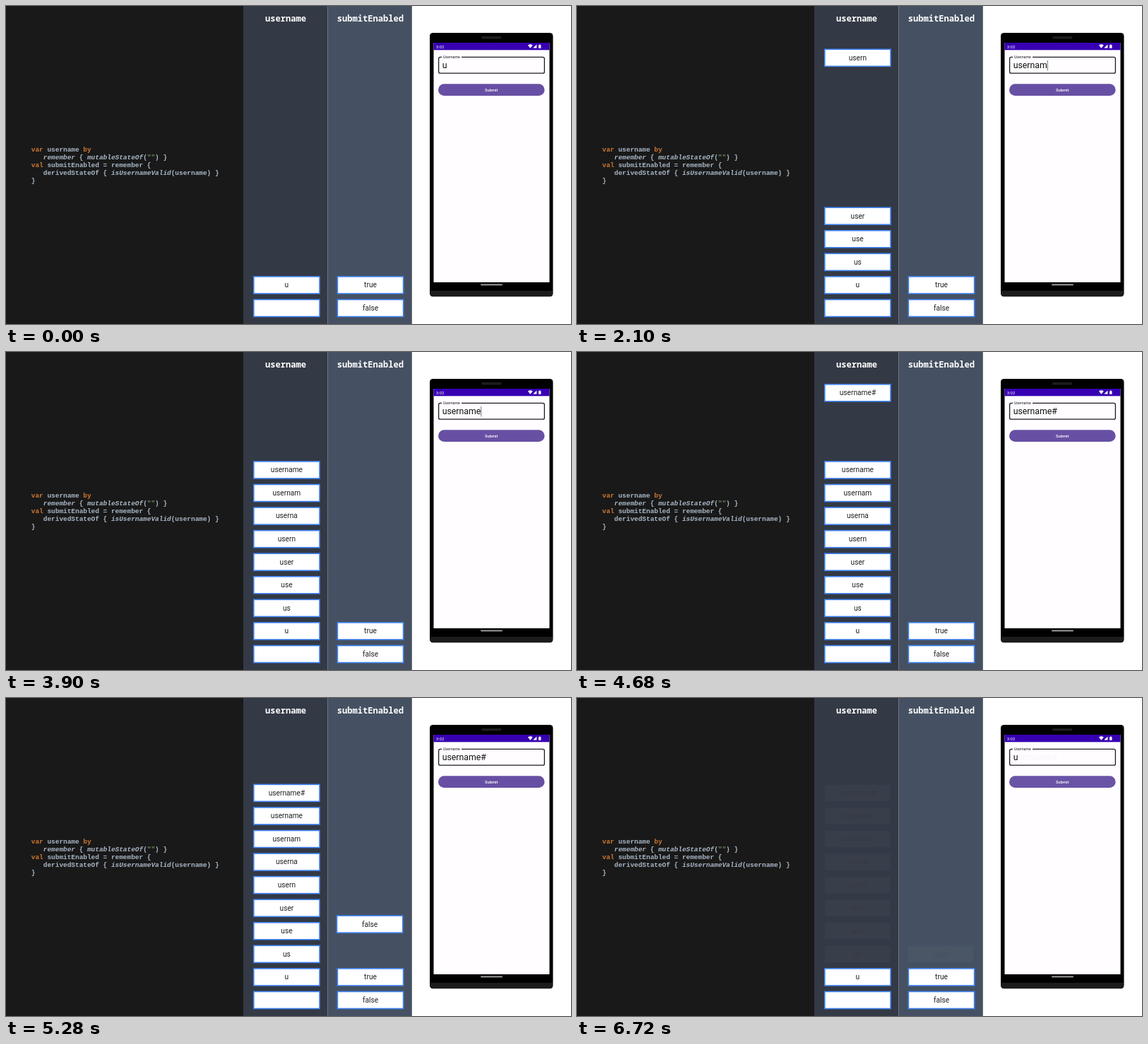
These frames come from a looping animation (800x450 px, 6.78 s). An HTML page:

```html
<!DOCTYPE html>
<html lang="en">
<head>
<meta charset="utf-8">
<title>Derived state</title>
<style>
  html, body { margin: 0; width: 100%; height: 100%; overflow: hidden; background: #fff; }
  svg { display: block; width: 800px; height: 450px; }
  text { white-space: pre; }
  .code { font: bold 9.43px "Liberation Mono", monospace; fill: #a9b7c6; }
  .key { fill: #cc7832; }
  .str { fill: #6a8759; }
  .call { font-style: italic; }
  .head { font: bold 12.1px "Noto Sans Mono", monospace; fill: #fff; text-anchor: middle; }
  .box rect { fill: #fff; stroke: #4285f4; stroke-width: 1.6; }
  .box text { font: 10.2px Roboto, sans-serif; fill: #202124; text-anchor: middle; }
  .phone { font-family: Roboto, sans-serif; }
</style>
</head>
<body>
<svg id="stage" viewBox="0 0 800 450">
  <rect width="800" height="450" fill="#fff"/>
  <rect width="336.5" height="450" fill="#191919"/>
  <rect x="336" width="119.5" height="450" fill="#333945"/>
  <rect x="455.5" width="119.3" height="450" fill="#455162"/>

  <g class="code">
    <text x="35.8" y="206"><tspan class="key">var</tspan> username <tspan class="key">by</tspan></text>
    <text x="35.8" y="217.1">   <tspan class="call">remember</tspan> { <tspan class="call">mutableStateOf</tspan>(<tspan class="str">""</tspan>) }</text>
    <text x="35.8" y="228.2"><tspan class="key">val</tspan> submitEnabled = remember {</text>
    <text x="35.8" y="239.3">   derivedStateOf { <tspan class="call">isUsernameValid</tspan>(username) }</text>
    <text x="35.8" y="250.4">}</text>
  </g>
  <text class="head" x="396" y="21.5">username</text>
  <text class="head" x="515.8" y="21.5">submitEnabled</text>

  <g class="phone">
    <rect x="600" y="38" width="174.5" height="373.3" rx="4.5" fill="#000"/>
    <path d="M600.5 403H774V407a4 4 0 0 1-4 4H604.500a4 4 0 0 1-4-4Z" fill="#1c1c1c"/>
    <rect x="673" y="43" width="28.500" height="3.600" rx="1.800" fill="#1d1d1d"/>
    <rect x="672" y="393.300" width="31" height="2.200" rx="1.100" fill="#8e8e8e"/>
    <g id="screens"></g>
  </g>
  <g id="boxes"></g>
</svg>
<script>
const LOOP = 6780;
const WORD = "username";
const ROW = 32.57, FLOOR = 427.5;
const COL_NAME = 397.4, COL_SUBMIT = 516;
const FADE_OUT = 6390;

const el = (name, attrs, parent, text) => {
  const node = document.createElementNS("http://www.w3.org/2000/svg", name);
  for (const k in attrs) node.setAttribute(k, attrs[k]);
  if (text !== undefined) node.textContent = text;
  parent.append(node);
  return node;
};
const clamp = v => Math.min(1, Math.max(0, v));
const easeInOut = (p, n) => p < .5 ? (2 * p) ** n / 2 : 1 - (2 - 2 * p) ** n / 2;
const rowY = i => FLOOR - i * ROW;

// One state of the phone's screen
function makeScreen(clock, enabled) {
  const g = el("g", {}, document.getElementById("screens"));
  el("rect", { x: 605.5, y: 52, width: 164, height: 339, fill: "#fffdff" }, g);
  el("rect", { x: 605.5, y: 52, width: 164, height: 10.3, fill: "#3700b3" }, g);
  el("text", { x: 608.7, y: 59.5, "font-size": 6, fill: "#fff" }, g, clock);
  el("path", {
    d: "M739 55.4Q742.4 53.3 745.8 55.4L742.4 59.7ZM746.2 59.6L751.4 54.4V59.600ZM754 55.2H755V54.5H756.5V55.2H757.5V59.7H754Z",
    fill: "#fff"
  }, g);
  el("rect", { x: 612.6, y: 72.4, width: 149.8, height: 22.8, rx: 2.3, fill: "none", stroke: "#1c1b1f", "stroke-width": 1.3 }, g);
  el("rect", { x: 617, y: 71, width: 28, height: 3, fill: "#fffdff" }, g);
  el("text", { x: 618.9, y: 74, "font-size": 5.3, fill: "#1c1b1f" }, g, "Username");
  const field = el("text", { x: 617.7, y: 88.3, "font-size": 12.3, fill: "#111" }, g, "");
  el("rect", { x: 612, y: 110.3, width: 150.6, height: 16.7, rx: 8.35, fill: enabled ? "#6750a4" : "#e3e0e5" }, g);
  el("text", {
    x: 687.2, y: 120.8, "font-size": 5.8, "font-weight": 500, "text-anchor": "middle",
    fill: enabled ? "#fff" : "#aaa8ad"
  }, g, "Submit");
  return { g, field };
}

function makeBox(label, x, row, fall) {
  const g = el("g", { class: "box" }, document.getElementById("boxes"));
  el("rect", { x: -46.6, y: -12, width: 93.2, height: 24 }, g);
  el("text", { x: 0, y: 3.4 }, g, label);
  const box = { g, x, row, fall };
  if (!fall) g.setAttribute("transform", `translate(${x} ${rowY(row)})`);
  return box;
}

const active = makeScreen("3:02", true);
const caret = el("rect", { y: 77, width: .8, height: 14.5, fill: "#555" }, active.g);
const disabled = makeScreen("2:45", false);
disabled.field.textContent = WORD + "#";

makeBox("", COL_NAME, 0);
makeBox("u", COL_NAME, 1);
makeBox("false", COL_SUBMIT, 0);
makeBox("true", COL_SUBMIT, 1);

const falling = [];
for (let n = 2; n <= WORD.length; n++) {
  const fall = { start: 1741 + (n - 2) * 110, time: 90, from: 40, power: 3 };
  falling.push(makeBox(WORD.slice(0, n), COL_NAME, n, fall));
}
falling.push(
  makeBox(WORD + "#", COL_NAME, 9, { start: 4431, time: 510, from: -13, power: 2 }),
  makeBox("false", COL_SUBMIT - .9, 2, { start: 4892, time: 510, from: -13, power: 2 })
);

// Moments at which each further character is typed
const KEYS = [1290, 1560, 1710, 1830, 1950, 2070, 2190, 3960];
const CARET_ON = [[960, 2580], [3660, 4230]];

function render(t) {
  const typed = t < FADE_OUT ? 1 + KEYS.filter(k => t >= k).length : 1;
  active.field.textContent = (WORD + "#").slice(0, typed);
  const blink = CARET_ON.some(([a, b]) => t >= a && t < b);
  caret.style.display = blink ? "" : "none";
  if (blink) caret.setAttribute("x", 617.8 + active.field.getComputedTextLength());

  const fade = 1 - clamp((t - FADE_OUT) / 340);
  disabled.g.style.opacity = clamp((t - 5420) / 400) * fade;

  for (const { g, x, row, fall } of falling) {
    const p = easeInOut(clamp((t - fall.start) / fall.time), fall.power);
    const y = fall.from + (rowY(row) - fall.from) * p;
    g.setAttribute("transform", `translate(${x} ${y.toFixed(2)})`);
    g.style.opacity = t >= fall.start ? fade : 0;
  }
}

const begin = performance.now();
function tick() {
  render((performance.now() - begin) % LOOP);
  requestAnimationFrame(tick);
}
tick();
</script>
</body>
</html>
```
